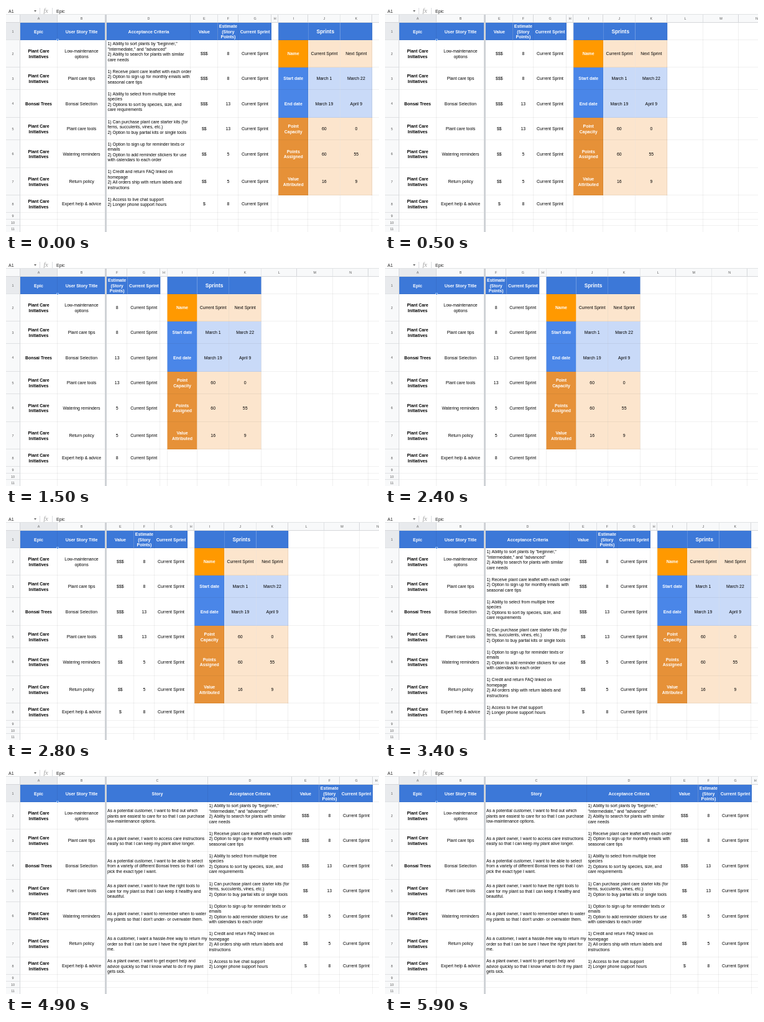
Animation of 600x364 px, one loop 6000 ms. Source, as an HTML page with a canvas:

```html
<!DOCTYPE html>
<html lang="en">
<head>
<meta charset="utf-8">
<style>
  html, body { margin: 0; width: 100%; height: 100%; overflow: hidden; background: #fff; }
  canvas { display: block; }
</style>
</head>
<body>
<canvas id="sheet" width="600" height="364"></canvas>
<script>
const ctx = document.getElementById('sheet').getContext('2d');
const W = 600, H = 364, FROZEN_X = 162, LOOP = 6000;
const SANS = '"Liberation Sans", Arial, sans-serif';
const rowEdges = [27, 55, 99, 135, 180, 216, 261, 305, 333, 343.5, 354, 365];
const columns = { A: 61, B: 77, C: 163, D: 135, E: 43.7, F: 33.3, G: 53, H: 11.2, I: 48, J: 51.3, K: 51.7, L: 57.5, M: 57.5, N: 57.5, O: 57.5 };

const stories = [
  { epic: 'Plant Care\nInitiatives', title: 'Low-maintenance\noptions', value: '$$$', points: 8,
    story: 'As a potential customer, I want to find out which\nplants are easiest to care for so that I can purchase\nlow-maintenance options.',
    criteria: '1) Ability to sort plants by "beginner,"\n"intermediate," and "advanced"\n2) Ability to search for plants with similar\ncare needs' },
  { epic: 'Plant Care\nInitiatives', title: 'Plant care tips', value: '$$$', points: 8,
    story: 'As a plant owner, I want to access care instructions\neasily so that I can keep my plant alive longer.',
    criteria: '1) Receive plant care leaflet with each order\n2) Option to sign up for monthly emails with\nseasonal care tips' },
  { epic: 'Bonsai Trees', title: 'Bonsai Selection', value: '$$$', points: 13,
    story: 'As a potential customer, I want to be able to select\nfrom a variety of different Bonsai trees so that I can\npick the exact type I want.',
    criteria: '1) Ability to select from multiple tree\nspecies\n2) Options to sort by species, size, and\ncare requirements' },
  { epic: 'Plant Care\nInitiatives', title: 'Plant care tools', value: '$$', points: 13,
    story: 'As a plant owner, I want to have the right tools to\ncare for my plant so that I can keep it healthy and\nbeautiful.',
    criteria: '1) Can purchase plant care starter kits (for\nferns, succulents, vines, etc.)\n2) Option to buy partial kits or single tools' },
  { epic: 'Plant Care\nInitiatives', title: 'Watering reminders', value: '$$', points: 5,
    story: "As a plant owner, I want to remember when to water\nmy plants so that I don't under- or overwater them.",
    criteria: '1) Option to sign up for reminder texts or\nemails\n2) Option to add reminder stickers for use\nwith calendars to each order' },
  { epic: 'Plant Care\nInitiatives', title: 'Return policy', value: '$$', points: 5,
    story: 'As a customer, I want a hassle-free way to return my\norder so that I can be sure I have the right plant for\nme.',
    criteria: '1) Credit and return FAQ linked on\nhomepage\n2) All orders ship with return labels and\ninstructions' },
  { epic: 'Plant Care\nInitiatives', title: 'Expert help & advice', value: '$', points: 8,
    story: 'As a plant owner, I want to get expert help and\nadvice quickly so that I know what to do if my plant\ngets sick.',
    criteria: '1) Access to live chat support\n2) Longer phone support hours' }
];
const headers = { A: 'Epic', B: 'User Story Title', C: 'Story', D: 'Acceptance Criteria', E: 'Value', F: 'Estimate\n(Story\nPoints)', G: 'Current Sprint' };
const fields = { A: 'epic', B: 'title', C: 'story', D: 'criteria', E: 'value', F: 'points' };
const sprints = [
  ['Name', 'Current Sprint', 'Next Sprint', '#ff9900', '#fce5cd'],
  ['Start date', 'March 1', 'March 22', '#4a86e8', '#c9daf8'],
  ['End date', 'March 19', 'April 9', '#4a86e8', '#c9daf8'],
  ['Point\nCapacity', '60', '0', '#e69138', '#fce5cd'],
  ['Points\nAssigned', '60', '55', '#e69138', '#fce5cd'],
  ['Value\nAttributed', '16', '9', '#e69138', '#fce5cd']
];
// [start time, first visible scrolling column]
const scrollSteps = [[0, 'D'], [300, 'E'], [600, 'F'], [2500, 'E'], [3100, 'D'], [3800, 'C']];

function rect(x, y, w, h, color) {
  ctx.fillStyle = color;
  ctx.fillRect(x, y, w, h);
}

function text(str, x, y, { size = 6.9, style = '', color = '#000', align = 'center', font = SANS } = {}) {
  ctx.font = `${style} ${size}px ${font}`;
  ctx.fillStyle = color;
  ctx.textAlign = align;
  const lines = String(str).split('\n');
  lines.forEach((line, i) => ctx.fillText(line, x, y + (i - (lines.length - 1) / 2) * 8.5 + size * 0.36));
}

function cell(col, x, w, row) {
  const top = rowEdges[row], h = rowEdges[row + 1] - top;
  const cx = x + w / 2, cy = top + h / 2;
  const white = { style: 'bold', color: '#fff' };
  if (col <= 'G' && row < 8) {
    if (row === 0) {
      rect(x, top, w, h, '#3c78d8');
      text(headers[col], cx, cy + 0.3, { ...white, size: 7 });
    } else {
      const value = col === 'G' ? 'Current Sprint' : stories[row - 1][fields[col]];
      if (col === 'C') text(value, x + 1, cy + 0.4, { align: 'left' });
      else if (col === 'D') text(value + '\n', x + 1.5, cy + 0.8, { align: 'left' });
      else text(value, cx, cy, { style: col === 'A' ? 'bold' : '' });
    }
  } else if (col >= 'I' && col <= 'K' && row < 7) {
    if (row === 0) {
      rect(x, top, w, h, '#3c78d8');
      if (col === 'K') text('Sprints', x + w - 75.5, cy, { ...white, size: 8.3 });
    } else {
      const [label, now, next, dark, light] = sprints[row - 1];
      rect(x, top, w, h, col === 'I' ? dark : light);
      text({ I: label, J: now, K: next }[col], cx, cy, col === 'I' ? white : {});
    }
  }
}

function gridLines(col, x, w) {
  const lineColor = 'rgba(0,0,0,.06)';
  // The merged sprint title has no inner column lines
  const top = col === 'I' || col === 'J' ? 55 : 27;
  rect(Math.round(x + w) - 1, top, 1, H - top, lineColor);
  for (const y of rowEdges.slice(1)) rect(x, Math.round(y) - 1, w, 1, lineColor);
}

function drawColumns(names, x) {
  for (const col of names) {
    const w = columns[col];
    if (x > W) break;
    for (let row = 0; row < 11; row++) cell(col, x, w, row);
    gridLines(col, x, w);
    rect(x, 14, w, 13, col === 'A' ? '#e8eaed' : '#f8f9fa');
    rect(Math.round(x + w) - 1, 14, 1, 13, '#d5d7da');
    text(col, x + w / 2, 20.5, { size: 5.4, color: '#555' });
    x += w;
  }
}

function drawToolbar() {
  rect(0, 0, W, 14, '#fff');
  text('A1', 4, 8, { size: 7, align: 'left', color: '#222' });
  ctx.fillStyle = '#555';
  ctx.beginPath();
  ctx.moveTo(45, 7);
  ctx.lineTo(49, 7);
  ctx.lineTo(47, 9.3);
  ctx.fill();
  rect(54, 3, 1, 10, '#dadce0');
  text('fx', 64, 7.5, { size: 10, style: 'italic', color: '#999', font: '"Liberation Serif", serif' });
  rect(74, 3, 1, 10, '#dadce0');
  text('Epic', 81, 8, { size: 7, align: 'left', color: '#222' });
  rect(0, 13, W, 1, '#e0e2e4');
}

function drawRowHeader() {
  rect(0, 14, 22, H, '#f8f9fa');
  rect(0, 27, 22, 28, '#e8eaed');
  for (let row = 0; row < 11; row++) {
    text(row + 1, 11, (rowEdges[row] + rowEdges[row + 1]) / 2, { size: 5.4, color: '#555' });
    rect(0, Math.round(rowEdges[row]) - 1, 22, 1, '#dfe1e3');
  }
  rect(22, 14, 1, H, '#d5d7da');
}

function draw(now) {
  const time = now % LOOP;
  const first = scrollSteps.filter(([from]) => from <= time).pop()[1];
  const names = Object.keys(columns);
  rect(0, 0, W, H, '#fff');
  drawColumns(names.slice(names.indexOf(first)), FROZEN_X);
  drawColumns(['A', 'B'], 22);
  drawRowHeader();
  rect(0, 26, W, 1, '#d5d7da');
  rect(159, 14, 3, H, '#cfd2d6');
  // Fill handle of the selected cell
  rect(81.5, 53, 3, 3, '#fff');
  rect(82, 53.5, 2, 2, '#1a73e8');
  drawToolbar();
}

const start = performance.now();
function tick() {
  draw(performance.now() - start);
  requestAnimationFrame(tick);
}
tick();
</script>
</body>
</html>
```
